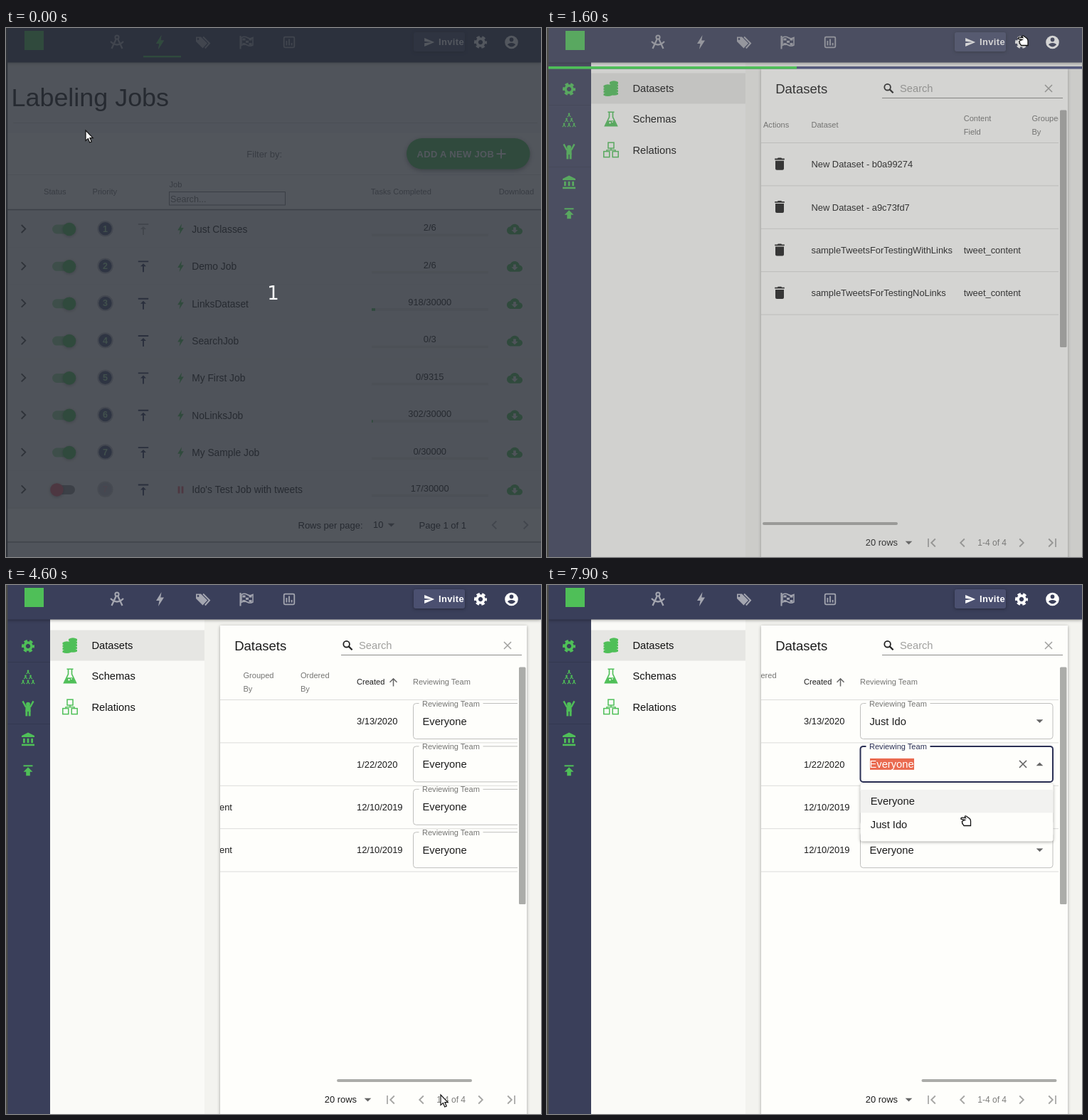
An HTML page that plays this animation: 752x744 px, repeating every 8 s.

```html
<!DOCTYPE html>
<html lang="en">
<head>
<meta charset="utf-8">
<title>Labeling jobs and datasets</title>
<style>
  html, body { margin: 0; width: 100%; height: 100%; overflow: hidden; background: #f3f3ef; }
  svg { display: block; width: 100vw; height: 100vh; }
  text { font-family: "Liberation Sans", Arial, sans-serif; white-space: pre; }
  .btn { font-weight: bold; letter-spacing: .03em; }
  .soft { filter: drop-shadow(0 1px 2px rgba(0,0,0,.35)); }
  .lift { filter: drop-shadow(0 2px 3px rgba(0,0,0,.4)); }
</style>
</head>
<body>
<svg id="stage" viewBox="0 0 752 744" xmlns="http://www.w3.org/2000/svg"></svg>
<script>
const NAVY = '#3a3f5a', GREEN = '#4fbf58', GREY = '#757573', INK = '#1c1c1c', PALE = '#a4a6b0';
const LOOP = 8000, STEP = 100;

const text = (x, y, s, size = 12.9, fill = INK, extra = '') =>
  `<text x="${x}" y="${y}" font-size="${size}" fill="${fill}" ${extra}>${s}</text>`;
const rect = (x, y, w, h, fill, extra = '') =>
  `<rect x="${x}" y="${y}" width="${w}" height="${h}" fill="${fill}" ${extra}/>`;
const circle = (x, y, r, fill, extra = '') =>
  `<circle cx="${x}" cy="${y}" r="${r}" fill="${fill}" ${extra}/>`;
const fillPath = (d, fill, extra = '') => `<path d="${d}" fill="${fill}" ${extra}/>`;
const line = (d, stroke, w = 1, extra = '') =>
  `<path d="${d}" fill="none" stroke="${stroke}" stroke-width="${w}" ${extra}/>`;
const at = (x, y, body, scale = 1) => `<g transform="translate(${x} ${y}) scale(${scale})">${body}</g>`;
const range = n => [...Array(n).keys()];
const middle = 'text-anchor="middle"';

// Icons are drawn around their own centre.
const icon = {
  gear: c => line('M7 0A7 7 0 1 1 7 -.01', c, 4, 'stroke-dasharray="4.3 3.03" stroke-dashoffset="2"') +
    line('M4.9 0A4.9 4.9 0 1 1 4.9 -.01', c, 3.4),
  bolt: c => fillPath('M2 -10L-5.5 2H-1L-2.5 10L5.5 -2.5H.8Z', c),
  cloud: c => at(-11, -11, fillPath('M19.35 10.04C18.67 6.59 15.64 4 12 4 9.11 4 6.6 5.64 5.35 8.04 2.34 8.36 0 10.91 0 14c0 3.31 2.69 6 6 6h13c2.76 0 5-2.24 5-5 0-2.64-2.05-4.78-4.65-4.96zM17 13l-5 5-5-5h3V9h4v4h3z', c), .917),
  user: c => circle(0, 0, 9.3, c) + circle(0, -3.6, 2.8, NAVY) +
    fillPath('M-5.5 3.6C-4.5 .2 4.5 .2 5.5 3.6Q0 9.4 -5.5 3.6Z', NAVY),
  trash: c => fillPath('M-6 -4.5H6V6.5Q6 8.5 4 8.5H-4Q-6 8.5 -6 6.5ZM-6.8 -7.6H-3.2L-2.2 -8.6H2.2L3.2 -7.6H6.8V-5.8H-6.8Z', c),
  toTop: c => line('M-7.2 -7H7.2M0 8V-2', c, 1.9) + fillPath('M-4 0L0 -4L4 0Z', c),
  upload: c => rect(-6.5, -7.5, 13, 2, c) + fillPath('M0 -4.5L6.5 2H2.8V7.5H-2.8V2H-6.5Z', c),
  bank: c => fillPath('M0 -9.5L9 -5V-3H-9V-5Z', c) + rect(-9, 6.5, 18, 2.6, c) +
    [-7, -1.4, 4.2].map(x => rect(x, -1.3, 2.8, 6.3, c)).join(''),
  kid: c => circle(0, -5.6, 3, c) + line('M-7.5 -10L-3.5 -2.5H3.5L7.5 -10', c, 2.4) +
    rect(-3.6, -3, 7.2, 7.5, c) + rect(-3.6, 3, 2.9, 8, c) + rect(.7, 3, 2.9, 8, c),
  team: c => [[0, -7], [-3.5, 0], [3.5, 0], [-7, 7], [0, 7], [7, 7]].map(([x, y]) =>
    circle(x, y - 1.8, 1.3, c) + line(`M${x - 2.3} ${y + 2.5}L${x} ${y - .3}L${x + 2.3} ${y + 2.5}`, c, 1.2)).join(''),
  compass: c => circle(0, -7, 2.6, 'none', `stroke="${c}" stroke-width="2"`) +
    line('M-1.2 -4.5L-7.5 9M1.2 -4.5L7.5 9M-9 -1Q0 8 9 -1', c, 2.3),
  tags: c => fillPath('M-10 -7.5H-3L6 1.5L-.5 8.5L-10 -1Z', c) + circle(-7, -4.5, 1.4, NAVY) +
    line('M0 -7.5L9 1.5L2.8 8.5', c, 2),
  flag: c => line('M-8.5 -9V9.5', c, 2) + line('M-7 -6.5Q-3 -9 1 -6.5T9 -6.5V4Q5 6.5 1 4T-7 4.5Z', c, 1.5) +
    range(9).filter(i => i % 2 === 0).map(i => rect(-5.5 + i % 3 * 4.5, -5.5 + (i / 3 | 0) * 3.3, 4, 3, c)).join(''),
  chart: c => rect(-7.3, -7.3, 14.6, 14.6, 'none', `stroke="${c}" stroke-width="1.8" rx="1.5"`) +
    line('M-3.6 4.5V-2M0 4.5V-4.5M3.6 4.5V1', c, 1.8),
  send: c => fillPath('M-8.6 7.6L9 0L-8.6 -7.6V-1.7L4 0L-8.6 1.7Z', c, 'transform="scale(.8)"'),
  stacks: c => [[4, -9, 5], [-4.5, -4, 4]].map(([x, y, n]) => range(n).map(i =>
    fillPath(`M${x - 6} ${y + i * 3.8}q6 -3.4 12 0v2.4q-6 2.4 -12 0Z`, c)).join('')).join(''),
  flask: c => line('M-4.5 -10H4.5M-2.5 -10V-3L-8.5 9.5H8.5L2.5 -3V-10', c, 1.6) +
    fillPath('M-4.2 2H4.2L7.5 8.7H-7.5Z', c) + circle(-1.5, 5, 1.2, '#fafaf7') + circle(2, 3.8, .9, '#fafaf7'),
  boxes: c => [[0, -6.5], [-6.2, 6], [6.2, 6]].map(([x, y]) =>
    rect(x - 4, y - 4, 8, 8, 'none', `stroke="${c}" stroke-width="1.5"`)).join('') + line('M0 -2.5V1M-6 2V0H6V2', c, 1.4),
  cross: c => line('M-5 -5L5 5M5 -5L-5 5', c, 1.5),
  down: c => fillPath('M-4.8 -2.3H4.8L0 2.5Z', c),
  up: c => fillPath('M-4.8 2.3H4.8L0 -2.5Z', c),
  next: c => line('M-2.8 -5.5L2.8 0L-2.8 5.5', c, 1.8),
  prev: c => line('M2.8 -5.5L-2.8 0L2.8 5.5', c, 1.8),
};
const put = (name, x, y, color, scale = 1) => at(x, y, icon[name](color), scale);

function navbar() {
  const tabs = ['compass', 'bolt', 'tags', 'flag', 'chart'];
  return rect(0, 0, 752, 48.5, NAVY, 'class="soft"') + rect(26, 4, 27, 27, GREEN) +
    tabs.map((n, i) => put(n, [156, 216.5, 277, 338, 398][i], 20, PALE)).join('') +
    rect(573, 6, 72, 27, '#4b5070', 'rx="3" class="soft"') + put('send', 595, 20, '#fff') +
    text(608, 24, 'Invite', 12.9, '#fff', 'class="btn"') +
    put('gear', 667, 20, '#fff') + put('user', 710.5, 20, '#fff');
}

function jobsPage() {
  const jobs = [['Just Classes', 2, 6], ['Demo Job', 2, 6], ['LinksDataset', 918, 30000], ['SearchJob', 0, 3],
    ['My First Job', 0, 9315], ['NoLinksJob', 302, 30000], ['My Sample Job', 0, 30000],
    ['Ido\'s Test Job with tweets', 17, 30000]];
  const rows = jobs.map(([name, done, total], i) => {
    const off = i === 7, y = 283 + i * 52.35;
    return rect(2, y - 27, 750, 52.4, '#ededea') + line(`M2 ${y + 25.7}H752`, '#d9d9d6') +
      put('next', 24.5, y - .5, '#444') +
      rect(65, y - 6.5, 32, 13, off ? '#8f8f8f' : '#95d59a', 'rx="6.5"') +
      circle(off ? 71.5 : 89, y, 9.3, off ? '#e0606f' : GREEN, 'class="soft"') +
      circle(139.5, y - .7, 10.2, off ? '#b4b5bd' : '#4d5476', `stroke="${off ? '#c3c3c6' : '#b5b7be'}" stroke-width="2"`) +
      text(139.5, y + 3.6, off ? 7 : i + 1, 12.5, off ? '#d3a5ae' : '#a5deaa', `${middle} font-weight="bold"`) +
      put('toTop', 193, y, i ? '#30355a' : '#aaa') +
      (off ? line(`M243 ${y - 5}v10M248 ${y - 5}v10`, '#e0606f', 2.8) : put('bolt', 245.5, y, GREEN, .78)) +
      text(261.2, y + 5, name, 13.8) +
      text(595.7, y + 2.4, `${done}/${total}`, 12.9, INK, middle) +
      rect(514, y + 6.5, 164, 3.6, '#dcdcda') +
      (total > 9 ? rect(514, y + 6.5, done > 99 ? 164 * done / total : 0, 3.6, GREEN) : '') +
      put('cloud', 715, y, GREEN);
  }).join('');
  return rect(0, 0, 752, 744, '#f3f3ef') + text(7.5, 110, 'Labeling Jobs', 35.9) + line('M10 133.5H747', '#d6d6d3') +
    rect(2, 148, 750, 575, '#fafaf6') + line('M2 206.5H752', '#e2e2df') +
    text(338.3, 182, 'Filter by:', 13, GREY) +
    rect(563, 155, 173.5, 43.5, GREEN, 'rx="21.7" class="lift"') +
    text(577.5, 182, 'ADD A NEW JOB', 12.9, '#fff', 'class="btn"') + line('M689.5 177H702.5M696 170.5V183.5', '#fff', 1.9) +
    text(53, 234, 'Status', 11.1, GREY) + text(121.5, 234, 'Priority', 11.1, GREY) + text(229.5, 224, 'Job', 11.1, GREY) +
    rect(229.5, 230.5, 163, 18.5, '#fdfdfa', 'stroke="#858585"') + text(231, 244.5, 'Search...', 12.6, GREY) +
    text(512.8, 234, 'Tasks Completed', 11.1, GREY) + text(692.8, 234, 'Download', 11.1, GREY) +
    rows + line('M2 255.5H752', '#8a8a8a', 1.6) +
    text(410.5, 703.5, 'Rows per page:', 13) + text(516, 703, '10') + put('down', 541.5, 699, '#666') +
    text(580.5, 703.5, 'Page 1 of 1', 13) + put('prev', 686.5, 699, '#aaa') + put('next', 730.5, 699, '#aaa') +
    line('M2 723H752', '#999', 1.6) + navbar() +
    put('bolt', 216.5, 20, GREEN) + rect(193, 39, 53, 2.4, GREEN);
}

const rowTop = i => 161.5 + i * 60.4;

function dataPage() {
  const names = ['New Dataset - b0a99274', 'New Dataset - a9c73fd7', 'sampleTweetsForTestingWithLinks', 'sampleTweetsForTestingNoLinks'];
  const dates = ['3/13/2020', '1/22/2020', '12/10/2019', '12/10/2019'];
  const head = (x, a, b) => b ? text(x, 131, a, 11.05, GREY) + text(x, 150, b, 11.05, GREY) : text(x, 140, a, 11.05, GREY);
  const rows = names.map((name, i) => {
    const y = rowTop(i) + 34.7;
    return put('trash', 327, y - 5, '#1c1c1c') + text(371.5, y, name) +
      (i > 1 ? text(585.7, y, 'tweet_content') : '') + text(841, y, dates[i]);
  }).join('');
  const menu = ['Datasets', 'Schemas', 'Relations'].map((s, i) =>
    put(['stacks', 'flask', 'boxes'][i], 90, 85 + i * 43.3, GREEN) + text(120.5, 90 + i * 43.3, s, 14.7, '#111')).join('');
  const side = ['gear', 'team', 'kid', 'bank', 'upload'].map((n, i) => put(n, 31, 86 + i * 43.7, GREEN)).join('');
  return rect(0, 0, 752, 744, '#f3f3ef') + rect(62, 49, 217, 695, '#fafaf7') + rect(62, 63.5, 217, 43, '#e6e6e3') + menu +
    rect(2, 48, 60, 696, NAVY) + line('M2 108.5H62M2 195.5H62', '#333850') + side +
    rect(301, 57, 431, 700, '#fefefb', 'class="soft"') +
    text(321.2, 91.5, 'Datasets', 18.5) + circle(478.6, 83.2, 4.3, 'none', 'stroke="#222" stroke-width="1.8"') +
    line('M481.7 86.4L486.6 91.3', '#222', 2.2) + text(496, 90, 'Search', 14.7, '#a0a09e') +
    put('cross', 705, 85, '#a0a09e') + line('M471 98.5H725', '#8c8c8a') +
    `<clipPath id="view">${rect(301, 100, 418, 590, '#000')}</clipPath><g clip-path="url(#view)">` +
    line(range(5).map(i => `M301 ${rowTop(i)}H719`).join(''), '#dcdcda') +
    `<g id="scroller">` + head(304, 'Actions') + head(371.5, 'Dataset') + head(585.7, 'Content', 'Field') +
    head(681.5, 'Grouped', 'By') + head(762, 'Ordered', 'By') + text(841, 140, 'Created', 11.05, INK) +
    line('M892.5 142.5V132M887.5 136.7L892.5 131.7L897.5 136.7', '#666', 1.5) + head(920, 'Reviewing Team') + rows +
    `<g id="fields"></g></g></g>` +
    rect(721, 115.5, 9.5, 333.5, '#abaca9', 'rx="1.5"') + `<g id="thumb">${rect(303, 695, 190, 4, '#abaca9', 'rx="2"')}</g>` +
    text(447.8, 728, '20 rows') + put('down', 508.5, 724, '#666') +
    put('prev', 543, 724, '#a5a5a3') + line('M536 718V730', '#a5a5a3', 1.7) + put('prev', 584, 724, '#a5a5a3') +
    text(605.3, 728, '1-4 of 4', 12, '#7d7d7b') + put('next', 667, 724, '#a5a5a3') +
    put('next', 708, 724, '#a5a5a3') + line('M715 718V730', '#a5a5a3', 1.7) +
    rect(301, 100, 418, 590, '#fefefb', 'id="veil"') + `<g id="popup"></g>` + navbar();
}

function field(i, s) {
  const y = rowTop(i) + 5, focused = s.focus === i, open = s.open === i, x = 920.5;
  const value = i === 0 && s.changed ? 'Just Ido' : 'Everyone', selected = focused && s.marked;
  return rect(x, y, 270.5, 50, '#fefefb', `rx="4" stroke="${focused ? '#2b3055' : '#bfbfbd'}" stroke-width="${focused ? 2 : 1}"`) +
    rect(x + 8, y - 2, 90, 4, '#fefefb') + text(x + 12.5, y + 4, 'Reviewing Team', 11.05, focused ? '#2b3055' : GREY) +
    (selected ? rect(x + 13.5, y + 17, 62, 16, '#ea6a4f') : '') +
    text(x + 13, y + 30, value, 14.7, selected ? '#fff' : INK) +
    (focused && s.caret ? line(`M${x + 75.5} ${y + 17}v16`, '#111') : '') +
    (focused ? put('cross', x + 228.5, y + 25, '#666') : '') + put(open ? 'up' : 'down', x + 252, y + 25, '#666');
}

function popup(i) {
  if (i < 0) return '';
  const y = rowTop(i) + 57.5;
  return rect(440.5, y, 271, 81, '#fefefb', 'rx="3" class="soft"') + rect(440.5, y + 8.5, 271, 32.5, '#f2f2f0') +
    text(454.8, y + 30, 'Everyone', 14.7) + text(454.8, y + 62.3, 'Just Ido', 14.7);
}

const pointers = {
  arrow: fillPath('M0 0V14.5L3.4 11.4L5.7 17L8.2 16L5.9 10.6H10.2Z', '#fff', 'stroke="#111" stroke-width="1.2"'),
  hand: fillPath('M-6.5 -2.8Q-7 -5 -5 -4.8L0 -4.2L-1.2 -6Q-.8 -7.8 1 -6.8L5.5 -3.5Q7 -2 7 0V6.5H-2.5L-4 4.2Q-5.5 4 -4.5 2.2Q-6 1.5 -4.5 0L-1 -1.5Z', '#fff', 'stroke="#111" stroke-width="1.3"'),
  beam: line('M-4 -7.5Q0 -7.5 0 -5Q0 -7.5 4 -7.5M0 -6V6M-4 7.5Q0 7.5 0 5Q0 7.5 4 7.5', '#fff', 3.4) +
    line('M-4 -7.5Q0 -7.5 0 -5Q0 -7.5 4 -7.5M0 -6V6M-4 7.5Q0 7.5 0 5Q0 7.5 4 7.5', '#111', 1.5),
};

const track = {
  cursor: [[0, 112, 144], [400, 503, 95], [500, 503, 95], [800, 653, 18], [900, 653, 18], [1200, 669, 18], [1800, 669, 18],
    [2500, 88, 160], [2600, 88, 160], [2700, 140, 160], [3200, 434, 708], [3300, 434, 708], [3600, 416, 691],
    [3800, 416, 691], [4000, 445, 698], [4100, 445, 698], [4600, 611, 717], [4800, 672, 721], [5000, 640, 638],
    [5500, 573, 195], [5900, 573, 195], [6200, 582, 285], [6600, 582, 285], [7100, 573, 250], [7600, 573, 250], [7900, 588.5, 332]],
  pointer: [[0, 'arrow'], [700, 'hand'], [1900, 'arrow'], [2400, 'hand'], [2700, 'arrow'], [5500, 'beam'], [6200, 'hand'],
    [6500, 'arrow'], [7000, 'beam'], [7800, 'hand']],
  scroll: [[4100, 0], [4600, 348], [4800, 480]],
  countdown: [[0, .8], [400, 0]],
  shade: [[1400, .3], [1600, .3], [1800, 0]],
  bar: [[1400, 120], [1600, 349], [1700, 560]],
  veil: [[6600, 0], [6700, .5], [7000, .5], [7100, 0]],
};

function tween(keys, t) {
  const i = keys.findIndex(k => k[0] > t);
  if (i < 0) return keys[keys.length - 1].slice(1);
  if (i === 0) return keys[0].slice(1);
  const a = keys[i - 1], b = keys[i], p = (t - a[0]) / (b[0] - a[0]);
  return a.slice(1).map((v, j) => v + (b[j + 1] - v) * p);
}
const latest = (keys, t) => keys.filter(k => k[0] <= t).pop()[1];
const between = (t, a, b) => t >= a && t < b;

stage.innerHTML = `<g id="jobs">${jobsPage()}</g><g id="data">${dataPage()}</g>` + rect(0, 0, 2.3, 744, '#4d4d49') +
  rect(2, 0, 750, 744, '#727272', 'id="shade"') +
  `<g id="loading">${rect(2, 54, 750, 3.6, '#565b7d')}${rect(2, 54, 0, 3.6, GREEN, 'id="bar"')}</g>` +
  rect(0, 0, 752, 744, '#292d36', 'id="dark"') +
  `<text id="count" x="375.5" y="382" font-size="26" fill="#fff" ${middle} style="font-family:'DejaVu Sans',sans-serif">1</text>` +
  `<g id="cursor"></g>`;

const el = id => document.getElementById(id);
const cache = {};
function fill(id, html) {
  if (cache[id] !== html) el(id).innerHTML = cache[id] = html;
}
const show = (id, on) => el(id).setAttribute('visibility', on ? 'visible' : 'hidden');
const fade = (id, v) => el(id).setAttribute('opacity', v);
const move = (id, x, y = 0) => el(id).setAttribute('transform', `translate(${x} ${y})`);

function draw(t) {
  const data = t >= 1400;
  show('jobs', !data);
  show('data', data);
  const [dark] = tween(track.countdown, t);
  fade('dark', dark);
  fade('count', dark / .8);
  fade('shade', data ? tween(track.shade, t)[0] : 0);
  show('loading', between(t, 1400, 1800));
  el('bar').setAttribute('width', tween(track.bar, t)[0]);
  fade('veil', tween(track.veil, t)[0]);

  const [scroll] = tween(track.scroll, t);
  move('scroller', -scroll);
  move('thumb', scroll * 223.5 / 480);

  const state = {
    focus: between(t, 5600, 7300) ? 0 : t >= 7300 ? 1 : -1,
    open: between(t, 5600, 6500) ? 0 : t >= 7400 ? 1 : -1,
    changed: t >= 6500, marked: t >= 7400, caret: between(t, 5600, 6200),
  };
  fill('fields', range(4).map(i => field(i, state)).join(''));
  fill('popup', popup(state.open));

  fill('cursor', pointers[latest(track.pointer, t)]);
  move('cursor', ...tween(track.cursor, t));
}

const start = performance.now();
function tick() {
  const t = (performance.now() - start) % LOOP;
  draw(Math.floor(t / STEP) * STEP);
  requestAnimationFrame(tick);
}
tick();
</script>
</body>
</html>
```
